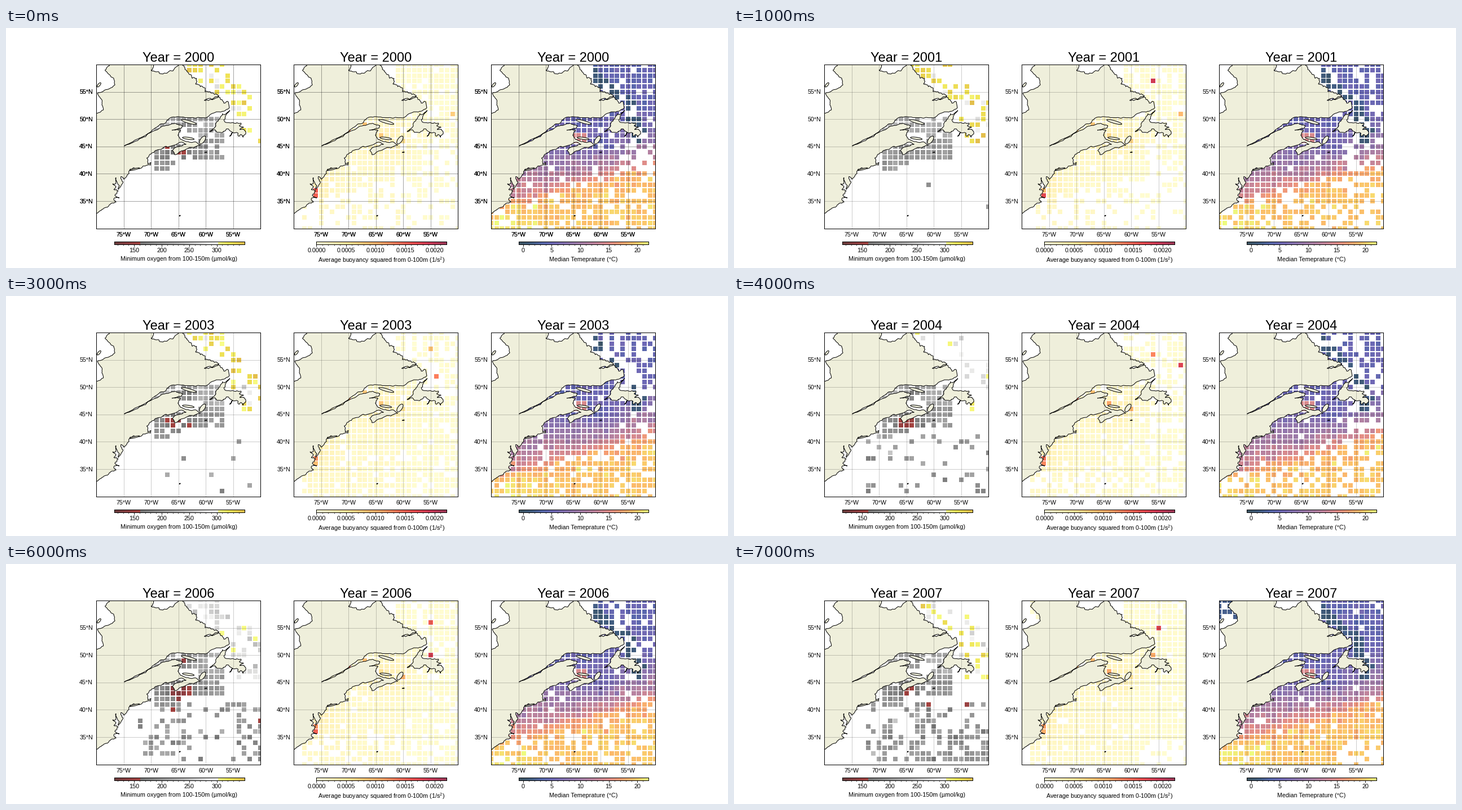
A matplotlib script for the animation above (8 s loop, 1280x427 px).

```python
import numpy as np
import matplotlib.pyplot as plt
from matplotlib.animation import FuncAnimation
from matplotlib.colors import LinearSegmentedColormap

W, H, DPI = 1280, 427, 128
PT = 72 / DPI                      # points per pixel
SIDE = 291.4                       # map edge in pixels, 30 degrees
FIRST, YEARS = 2000, 8
plt.rcParams.update({"font.family": "Liberation Sans", "mathtext.fontset": "custom",
                     "mathtext.rm": "Liberation Sans", "mathtext.default": "regular"})

blend = LinearSegmentedColormap.from_list
OXY = blend("oxy", [(0, "#400505"), (.1, "#6a070b"), (.199, "#8e0f0a"), (.2, "#505050"),
                    (.5, "#989898"), (.799, "#f3f3f2"), (.8, "#f8fe69"), (.88, "#ecdf28"),
                    (1, "#dcae19")])
HEAT = blend("thermal", [(0, "#042333"), (.1, "#0d3160"), (.18, "#263c93"), (.26, "#443da0"),
                         (.38, "#6b4d97"), (.5, "#915b8c"), (.6, "#b3637f"), (.7, "#db6e66"),
                         (.78, "#f3834c"), (.88, "#fbae40"), (.94, "#f7cf46"), (1, "#e8fa5b")])
FIRE = plt.get_cmap("YlOrRd")

# Key points of the coast as (degrees west, latitude)
SOUTH = [(81, 32), (79.9, 32.75), (79.2, 33.3), (78, 33.87), (77.3, 34.6), (76.4, 34.8),
         (76.8, 35.4), (75.8, 35.6), (76.6, 36.05), (76, 36.9), (76.8, 37.1), (76.4, 37.7),
         (77, 38.2), (76.4, 38.2), (76.4, 39.3), (76.2, 38.5), (75.8, 37.9), (76, 37.15),
         (75.1, 38.5), (75.5, 39.5), (74.9, 39), (74, 40.1), (73.8, 40.85), (71.5, 41.4),
         (70.1, 41.6), (70, 42.05), (70.6, 41.8), (70.8, 42.9), (70.2, 43.6), (68.8, 44.4), (67, 44.9)]
FUNDY = [(65.6, 45.3), (64.5, 45.8), (63.6, 45.4), (65, 45), (66.1, 44.3), (65.7, 43.5),
         (63.6, 44.5), (61, 45.25), (61.6, 45.7), (63.5, 45.9), (64.6, 46.3), (65.1, 47.1),
         (64.6, 48), (66.2, 48), (64.4, 48.4), (64.3, 48.85), (65.6, 49.25), (67.3, 48.85),
         (69.4, 47.9), (71, 46.8), (73.4, 45.7), (74.9, 45.1)]
NORTH_SHORE = [(73.3, 45.9), (71.4, 46.85), (69.6, 48.15), (68.2, 49.15), (67.3, 49.35), (66.6, 50.2),
               (63.8, 50.3), (60, 50.25), (58.4, 51.2), (57, 51.45), (55.7, 52.1)]
LABRADOR = [(55.9, 53.2), (57.3, 53.6), (58.4, 54), (60.3, 53.45), (57.6, 54.3), (58.7, 54.8),
            (60.2, 55.1), (60.6, 56), (61.9, 56.5), (61.7, 57.5), (62.8, 58.2), (63.6, 59), (64.5, 60.4)]
UNGAVA = [(65.2, 59.7), (66, 58.85), (67.8, 58.3), (68.6, 58.7), (70, 59), (69.6, 59.5), (70, 61)]
HUDSON = [(77.6, 61), (77.6, 59.8), (78.4, 58.95), (76.8, 57.5), (76.6, 56.3), (77.6, 55.6),
          (79.8, 54.75), (79, 53.6), (78.7, 51.7), (79.8, 51.1), (81, 51.2)]
NEWFOUNDLAND = [(59.3, 47.7), (58.4, 48.5), (57.9, 49.6), (57, 51), (55.6, 51.6), (56.7, 49.9),
                (55.1, 49.4), (53.6, 49.3), (53.9, 48.8), (53.1, 48.5), (53.8, 48.1), (53, 48.1),
                (52.7, 47.6), (53.2, 46.7), (53.6, 47.2), (54, 46.9), (54.2, 47.5), (55.7, 46.9),
                (55.1, 47.6), (57.4, 47.6), (59.3, 47.7)]
# Smaller islands: west, latitude, half length, half width, tilt in degrees
ISLANDS = [(63.1, 49.5, 1.45, .25, -16), (63.2, 46.5, 1.1, .2, -8), (60.6, 46.2, .85, .4, 55),
           (73, 40.85, .95, .12, 14), (60, 43.95, .2, .04, 8), (64.75, 32.33, .12, .06, 30),
           (79.5, 56.3, .5, .2, 50)]


def rough(points, amp, seed):
    """Fractal coast: push each midpoint sideways, three times over."""
    rng = np.random.default_rng(seed)
    p = np.array(points, float) * (-1, 1)
    for _ in range(3):
        step = np.diff(p, axis=0)
        push = amp * np.clip(rng.normal(size=(len(step), 1)), -1.6, 1.6)
        mid = p[:-1] + step / 2 + push * step[:, ::-1] * (-1, 1)
        p = np.insert(p, range(1, len(p)), mid, axis=0)
    return p


def island(west, lat, a, b, tilt):
    t, r = np.linspace(0, 2 * np.pi, 13), np.radians(tilt)
    x, y = a * np.cos(t), b * np.sin(t)
    return np.c_[-west + x * np.cos(r) - y * np.sin(r), lat + x * np.sin(r) + y * np.cos(r)]


parts = [(SOUTH, .13), (FUNDY, .09), (NORTH_SHORE, .07), (LABRADOR, .2), (UNGAVA, .13), (HUDSON, .08)]
LAND = [np.vstack([rough(p, amp, i) for i, (p, amp) in enumerate(parts)]),
        rough(NEWFOUNDLAND, .17, 7)]
LAND += [island(*shape) for shape in ISLANDS]

# Data sit on whole degrees.
lat, west = np.meshgrid(np.arange(60, 29, -1), np.arange(80, 49, -1), indexing="ij")
coast = np.interp(lat, [46, 48, 51, 53, 55, 57, 60], [54, 53.5, 55, 55, 58, 60.3, 63.2])
labrador_sea = (lat > 45) & (west < coast + 1)
hudson = (lat > 56) & (west > 76)

# Yearly share of cells with data, by region
NORTH = [.82, .75, .65, .6, .6, .55, .82, .97]
MIDDLE = [.4, .6, .6, .7, .6, .35, .75, .9]
SOUTH_SHARE = [.78, .7, .7, .78, .7, .7, .8, .92]
SOUTHEAST = [.85, .5, .7, .72, .6, .4, .65, .2]
STABLE = [.4, .5, .8, 1, 1, 1, 1, 1]           # southern casts usable for buoyancy
OPEN_OXYGEN = [0, .01, 0, .03, .1, .2, .3, .42]
# Yearly oxygen level in the Labrador Sea and its drop on the shelf
SEA_LEVEL = [313, 322, 318, 315, 290, 250, 275, 305]
DROP = [55, 10, 45, 75, 60, 65, 85, 55]
FRONT_SHIFT = [0, 0, -.2, -.5, -.5, .2, 0, 0]


def hill(n, w, dn, dw):
    return np.exp(-((lat - n) / dn) ** 2 - ((west - w) / dw) ** 2)


def covered(i, south_factor=1, west_limit=80):
    rng = np.random.default_rng(i + 20)
    share = np.where((lat < 35) & (west < 59), SOUTHEAST[i], SOUTH_SHARE[i]) * south_factor
    share = np.where((lat > 40) & (west < 57), MIDDLE[i], share)
    share = np.where((lat > 45) & (west < 58), NORTH[i], share)
    share = np.where((lat > 52) & (west < 62), NORTH[i], share)
    shelf = (lat > 38 + (65 - west) * .25) & (lat < 51) & (west > 56)
    share = np.where(shelf, .96, share)
    share = np.where((lat > 50) & (west > 61), hudson * .7 * (i in (5, 7)), share)
    return (rng.random(lat.shape) < share) & (west <= west_limit)


def oxygen_field(i):
    rng = np.random.default_rng(i)
    noise = rng.normal(size=lat.shape)
    patch = rng.random(lat.shape)
    patch = sum(np.roll(patch, (a, b), (0, 1)) for a in (-1, 0, 1) for b in (-1, 0, 1)) / 9
    uneven = np.clip(1 + 6 * (patch - .5), 0, 3)

    open_sea = (lat < 42) & (lat > 30) & (west < 73)
    share = OPEN_OXYGEN[i] * uneven * open_sea
    value = 205 + 20 * noise

    floor = 43 - np.clip(west - 63, 0, 4) / 2
    shelf = (lat >= floor) & (lat < 51) & (west > 56) & (west < 70)
    shallow = (lat > 45) & (lat < 48) & (west > 61)
    share = np.where(shelf & ~shallow, .9, share)
    low = hill(43.5, 65, 1.5, 3) + hill(48.8, 63.5, 1, 1.6)
    value = np.where(shelf, 208 + 25 * (lat > 46) - DROP[i] * low + 9 * noise, value)

    share = np.where(labrador_sea, .33 * uneven * np.clip((west - coast + 8) / 4, 0, 1), share)
    value = np.where(labrador_sea, SEA_LEVEL[i] + 18 * noise, value)
    return np.where(rng.random(lat.shape) < share, value, np.nan)


def buoyancy_field(i):
    rng = np.random.default_rng(i + 50)
    value = .3 + 2.2 * hill(46.5, 63, 3, 5) + 1.6 * hill(39, 75, 4, 3) + .7 * rng.random(lat.shape)
    value += .5 * ((lat < 46) & (west > 60))
    field = np.where(covered(i, STABLE[i], 78), value, np.nan)
    mouths = [(37, 76, 16), (36, 76, 16), (49, 67, 9), (48, 70, 13), (47, 64, 9), (46, 60, 9)]
    stray = [(rng.integers(50, 58), rng.integers(51, 58), 14) for _ in range(2)]
    for n, w, v in mouths + stray:
        field[60 - n, 80 - w] = v * rng.uniform(.5, 1.35)
    return field * 1e-4


def temperature_field(i):
    rng = np.random.default_rng(i + 90)
    noise = rng.normal(size=lat.shape)
    d = lat - (37 + .27 * (70 - west) + FRONT_SHIFT[i])      # degrees north of the front
    t = np.interp(d, [-6, -3, -1, 0, 2, 4.5, 7, 12], [19.6, 19.2, 18, 15, 11, 8.5, 6.3, 4.8])
    t += np.clip(west - 64, 0, 8) * .22 * ((d > 1) & (lat < 46))
    t += 1.5 * (lat < 35) * np.clip((west - 69) / 7, 0, 1)
    t -= 2.5 * hill(45, 59.5, 1.5, 3)
    t += noise * np.where(np.abs(d) < 4, 1, .6)
    t = np.where(labrador_sea & (west > coast - 1.6), 1 + noise / 2, t)
    t = np.where(hill(46.5, 64, 1, 2) > .5, 14.5, t)
    t = np.where(hudson, 2, t)
    return np.where(covered(i), t, np.nan)


fig = plt.figure(figsize=(W / DPI, H / DPI), dpi=DPI, facecolor="white")


def label(x, y, text, size=10.7, ha="center"):
    return fig.text(x / W, 1 - y / H, text, fontsize=size * PT, ha=ha, va="baseline")


def box_axes(x, y, w, h):
    ax = fig.add_axes([x / W, 1 - (y + h) / H, w / W, h / H])
    for spine in ax.spines.values():
        spine.set(linewidth=PT, zorder=6)
    return ax


class Panel:
    def __init__(self, x, field, cmap, lo, hi):
        top = 65.2
        self.field = field
        ax = box_axes(x, top, SIDE, SIDE)
        ax.set(xlim=(-80, -50), ylim=(30, 60), xticks=[], yticks=[])
        self.dots = ax.scatter(-west, lat, c=np.zeros(lat.size), s=(8 * PT) ** 2, marker="s",
                               cmap=cmap, vmin=lo, vmax=hi, alpha=.78, linewidths=0, zorder=2)
        for shape in LAND:
            ax.fill(*shape.T, facecolor="#efefdb", edgecolor="black", linewidth=PT, zorder=3)
        self.title = label(x + SIDE / 2 - .3, 59.7, "", 23.6)
        self.extra = []
        for again in (False, True):       # the opening year carries its grid twice
            made = []
            style = dict(color="black", alpha=.25, linewidth=.8 * PT, zorder=4)
            for k in range(1, 6):
                lon, north, step = 80 - 5 * k, 60 - 5 * k, SIDE / 6 * k
                made += [ax.axvline(-lon, **style), ax.axhline(north, **style),
                         label(x + step, 370.6, f"{lon}°W", 10.6),
                         label(x - 6, top + step + 3.6, f"{north}°N", 10.6, "right")]
            if again:
                self.extra = made

    def show(self, i):
        self.title.set_text(f"Year = {FIRST + i}")
        self.dots.set_array(np.ma.masked_invalid(self.field(i)).ravel())
        for art in self.extra:
            art.set_visible(i == 0)


def colorbar(x, cmap, lo, hi, ticks, minor, fmt, text, base):
    width = 230.5
    ax = box_axes(x, 380, width, 4.6)
    ax.imshow(np.linspace(0, 1, 256)[None], cmap=cmap, alpha=.78, aspect="auto",
              extent=(lo, hi, 0, 1))
    ax.set_yticks([])
    ax.set_xticks(ticks, [""] * len(ticks))
    ax.set_xticks(np.arange(np.ceil(lo / minor), hi / minor) * minor, minor=True)
    ax.tick_params(length=4 * PT, width=.9 * PT)
    ax.tick_params(which="minor", length=2 * PT, width=.7 * PT)
    for tick in ticks:
        label(x + width * (tick - lo) / (hi - lo), 398.6, format(tick, fmt))
    label(x + width / 2 - .3, base, text)


panels = [Panel(160, oxygen_field, OXY, 114, 350),
          Panel(510, buoyancy_field, FIRE, 0, .0022),
          Panel(860, temperature_field, HEAT, -.8, 22)]
colorbar(192, OXY, 114, 350, range(150, 301, 50), 10, "d",
         "Minimum oxygen from 100-150m (µmol/kg)", 414)
colorbar(550.4, FIRE, 0, .0022, np.arange(5) * .0005, .0001, ".4f",
         "Average buoyancy squared from 0-100m (1/s$^2$)", 417)
colorbar(908.8, HEAT, -.8, 22, range(0, 21, 5), 1, "d", "Median Temeprature (°C)", 415)


def draw(i):
    for panel in panels:
        panel.show(i)
    return []


anim = FuncAnimation(fig, draw, frames=YEARS, init_func=lambda: draw(0), interval=1000,
                     repeat=True, blit=False)
plt.show()
```
